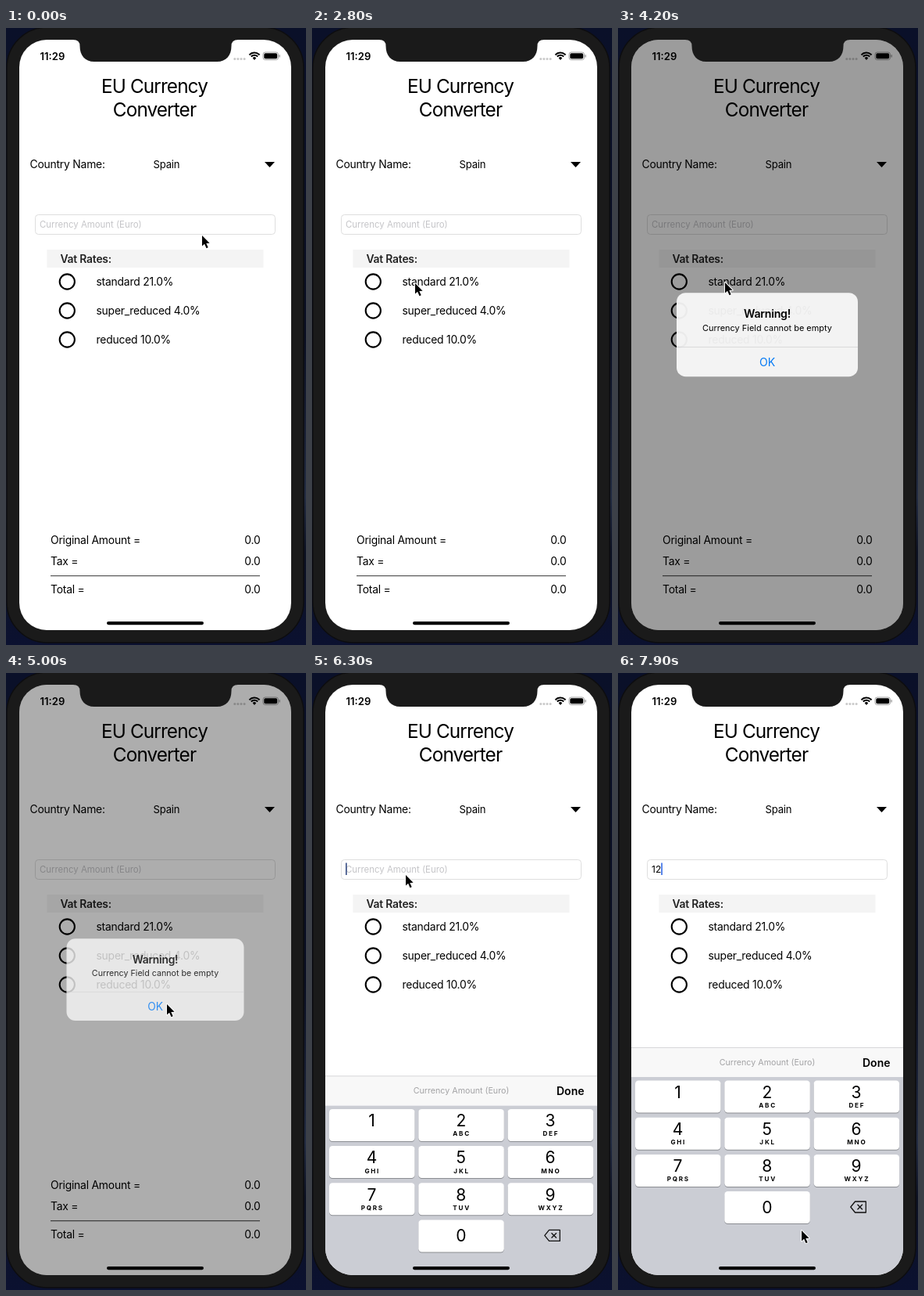
Write an HTML page with a canvas that moves like this. It is 384 px wide and 788 px high and loops after 8000 ms.

```html
<!DOCTYPE html>
<html lang="en">
<head>
<meta charset="utf-8">
<title>EU Currency Converter</title>
<style>
html, body { margin: 0; width: 100%; height: 100%; overflow: hidden; background: #0b1130; }
canvas { display: block; width: 384px; height: 788px; }
</style>
</head>
<body>
<canvas id="stage"></canvas>
<script>
const W = 384, H = 788, LOOP = 8000, STEP = 100;
const BEZEL = '#1a1a1a';
const canvas = document.getElementById('stage');
const ctx = canvas.getContext('2d');
const dpr = window.devicePixelRatio || 1;
canvas.width = W * dpr;
canvas.height = H * dpr;

// Each row: time, then values
const POINTER = [
  [0, 251, 265], [800, 251, 265], [900, 120, 203], [1000, 120, 203], [1200, 144, 197],
  [1400, 128, 225], [1600, 109, 258], [1900, 92, 315], [2100, 89, 335], [2300, 110, 343],
  [2500, 131, 325], [2600, 131, 325], [2700, 132, 322], [2800, 132, 326], [3500, 132, 326],
  [3700, 134, 325], [3800, 134, 325], [3900, 137, 325], [4300, 137, 325], [4500, 172, 378],
  [4700, 205, 421], [4900, 206, 423], [5200, 206, 423], [5400, 165, 340], [5600, 120, 253],
  [5700, 120, 258], [6300, 120, 258], [6500, 98, 390], [6700, 82, 490], [6900, 77, 537],
  [7100, 77, 537], [7300, 188, 538], [7500, 191, 538], [7700, 228, 630], [7900, 235, 712]
];
// dim, alert opacity, alert scale
const ALERT = [
  [4000, 0, 0, 1.18], [4100, .22, .6, 1.09], [4200, .39, 1, 1.022], [4300, .4, 1, 1.004],
  [4400, .4, 1, 1], [4900, .4, 1, 1], [5000, .32, .8, 1], [5100, .15, .38, 1],
  [5200, .039, .1, 1], [5300, 0, 0, 1]
];
const CLICKS = [[3000, 3100], [3900, 4100], [4900, 5000], [7000, 7100], [7400, 7500]];
const KEYS = [
  ['1', ''], ['2', 'ABC'], ['3', 'DEF'], ['4', 'GHI'], ['5', 'JKL'], ['6', 'MNO'],
  ['7', 'PQRS'], ['8', 'TUV'], ['9', 'WXYZ'], null, ['0', '']
];

const within = (t, a, b) => t >= a && t < b;

function sample(rows, t) {
  if (t <= rows[0][0]) return rows[0].slice(1);
  for (let i = 1; i < rows.length; i++) {
    const a = rows[i - 1], b = rows[i];
    if (t <= b[0]) {
      const u = (t - a[0]) / (b[0] - a[0]);
      return a.slice(1).map((v, k) => v + (b[k + 1] - v) * u);
    }
  }
  return rows[rows.length - 1].slice(1);
}

function text(s, x, y, size, { color = '#000', weight = 400, align = 'left', track = -.016 } = {}) {
  ctx.font = `${weight} ${size}px Inter, Roboto, sans-serif`;
  ctx.letterSpacing = `${size * track}px`;
  ctx.textAlign = align;
  ctx.fillStyle = color;
  ctx.fillText(s, x, y);
}

function box(x, y, w, h, r, fill, stroke, line = 1) {
  ctx.beginPath();
  ctx.roundRect(x, y, w, h, r);
  if (fill) { ctx.fillStyle = fill; ctx.fill(); }
  if (stroke) { ctx.strokeStyle = stroke; ctx.lineWidth = line; ctx.stroke(); }
}

function circle(x, y, r, fill, stroke, line) {
  ctx.beginPath();
  ctx.arc(x, y, r, 0, Math.PI * 2);
  if (fill) { ctx.fillStyle = fill; ctx.fill(); }
  if (stroke) { ctx.strokeStyle = stroke; ctx.lineWidth = line; ctx.stroke(); }
}

function poly(points, fill, stroke, line) {
  ctx.beginPath();
  points.forEach(([x, y]) => ctx.lineTo(x, y));
  ctx.closePath();
  ctx.lineJoin = 'round';
  if (stroke) { ctx.strokeStyle = stroke; ctx.lineWidth = line; ctx.stroke(); }
  if (fill) { ctx.fillStyle = fill; ctx.fill(); }
}

function drawPhone() {
  const g = ctx.createLinearGradient(0, 0, 0, H);
  g.addColorStop(0, '#0a1029');
  g.addColorStop(.5, '#0b1024');
  g.addColorStop(.76, '#232c42');
  g.addColorStop(.85, '#0d1224');
  g.addColorStop(1, '#0b1130');
  ctx.fillStyle = g;
  ctx.fillRect(0, 0, W, H);
  box(1, -1, 380, 786, 52, BEZEL, '#0d0d0f', 1.5);
}

function drawStatus() {
  text('11:29', 43.5, 41, 13.1, { weight: 600, track: 0 });
  for (let i = 0; i < 4; i++) circle(292.8 + i * 4.1, 39.6, 1.5, '#c9c9c9');
  ctx.strokeStyle = '#000';
  ctx.lineWidth = 2;
  for (const r of [9, 5.8]) {
    ctx.beginPath();
    ctx.arc(318, 40.5, r, -Math.PI * .76, -Math.PI * .24);
    ctx.stroke();
  }
  ctx.beginPath();
  ctx.moveTo(318, 41);
  ctx.arc(318, 40.5, 3.2, -Math.PI * .76, -Math.PI * .24);
  ctx.fillStyle = '#000';
  ctx.fill();
  box(329, 31, 19.5, 9.6, 2.8, null, '#999', .9);
  box(330.3, 32.3, 16.9, 7, 1.7, '#000');
  box(349.5, 34, 1.3, 3.6, .8, '#999');
}

function drawField(t) {
  box(37.5, 238.5, 307, 25, 4, '#fff', '#dedede');
  const typed = t >= 7500 ? '12' : t >= 7100 ? '1' : '';
  if (typed) text(typed, 43, 255, 12, { track: 0 });
  else text('Currency Amount (Euro)', 43, 255, 11.4, { color: '#c5c5c8', track: 0 });
  if (t >= 6300) {
    const x = typed ? 43 + ctx.measureText(typed).width : 43;
    ctx.globalAlpha = typed || within(t, 6300, 6700) || t >= 7000 ? 1 : within(t, 6700, 6800) ? .75 : .1;
    ctx.fillStyle = typed ? '#3f73e8' : '#41568a';
    ctx.fillRect(x, 242.5, 1.7, 15.5);
    ctx.globalAlpha = 1;
  }
}

function drawForm(t) {
  ctx.fillStyle = '#fff';
  ctx.fillRect(17, 15, 348, 754);
  drawStatus();
  const title = { align: 'center', track: -.036 };
  text('EU Currency', 190, 82.5, 24.3, title);
  text('Converter', 190, 112.5, 24.3, title);

  text('Country Name:', 30.5, 179, 13.9);
  text('Spain', 188.5, 179, 13.1);
  poly([[331, 171], [344, 171], [337.5, 178]], '#000');
  drawField(t);

  ctx.fillStyle = '#f4f4f4';
  ctx.fillRect(52.5, 283, 277, 23);
  text('Vat Rates:', 69.5, 300, 13.9, { weight: 600, color: '#222' });
  ['standard 21.0%', 'super_reduced 4.0%', 'reduced 10.0%'].forEach((s, i) => {
    const y = 324 + i * 37;
    circle(78.3, y, 9.6, null, '#000', 2.1);
    text(s, 115.5, y + 5, 13.9);
  });

  [['Original Amount =', 658.5], ['Tax =', 686], ['Total =', 721.5]].forEach(([s, y]) => {
    text(s, 57, y, 13.9);
    text('0.0', 325.5, y, 13.9, { align: 'right' });
  });
  ctx.fillStyle = '#333';
  ctx.fillRect(57, 699.2, 268, 1);
}

function drawAlert(t) {
  const [dim, alpha, scale] = sample(ALERT, t);
  if (!alpha) return;
  ctx.fillStyle = `rgba(0,0,0,${dim})`;
  ctx.fillRect(17, 15, 348, 754);
  ctx.save();
  ctx.globalAlpha = alpha;
  ctx.translate(191, 391.7);
  ctx.scale(scale, scale);
  box(-113.5, -52.4, 227, 104.8, 11.3, `rgba(248,248,248,${t <= 4200 ? .945 : .975})`);
  if (within(t, 4900, 5000)) box(-113.5, 15.6, 227, 36.8, [0, 0, 11.3, 11.3], '#dcdcdc');
  text('Warning!', 0, -21.2, 13.8, { weight: 600, align: 'center' });
  text('Currency Field cannot be empty', 0, -4.6, 10.7, { align: 'center', track: 0 });
  ctx.fillStyle = '#d3d3d5';
  ctx.fillRect(-113.5, 15.2, 227, .8);
  text('OK', 0, 39.4, 13.8, { color: '#067bf5', align: 'center' });
  ctx.restore();
}

function drawBackspace() {
  poly([[297.8, 682], [303.5, 675], [317.3, 675], [317.3, 689], [303.5, 689]], null, '#111', 1.3);
  ctx.beginPath();
  ctx.moveTo(306.5, 678.8);
  ctx.lineTo(312.9, 685.2);
  ctx.moveTo(312.9, 678.8);
  ctx.lineTo(306.5, 685.2);
  ctx.stroke();
}

function drawKeyboard(t) {
  if (t < 6200) return;
  const u = Math.min(1, (t - 6100) / 400);
  ctx.save();
  ctx.translate(0, 291 * (1 - u) ** 3);
  ctx.fillStyle = '#cbcdd4';
  ctx.fillRect(17, 516, 348, 253);
  ctx.fillStyle = '#f8f8f8';
  ctx.fillRect(17, 478, 348, 38);
  ctx.fillStyle = '#d4d4d6';
  ctx.fillRect(17, 478, 348, .9);
  text('Currency Amount (Euro)', 191, 501, 10.7, { color: '#a3a3a5', align: 'center', track: 0 });
  text('Done', 313, 502.5, 14, { weight: 600, track: 0 });

  const pressed = within(t, 7000, 7100) ? '1' : within(t, 7400, 7500) ? '2' : '';
  KEYS.forEach((key, i) => {
    if (!key) return;
    const [digit, letters] = key;
    const x = 22 + (i % 3) * 114.3, y = 520.5 + Math.floor(i / 3) * 47.2;
    box(x, y + 1, 109.5, 41, 4.2, '#8b8d92');
    box(x, y, 109.5, 41, 4.2, digit === pressed ? '#b3b7c1' : '#fff');
    const mid = x + 54.5;
    text(digit, mid, y + (digit === '0' ? 27.8 : 22.3), 21, { align: 'center', track: 0 });
    text(letters, mid + .8, y + 34.5, 8.1, { weight: 700, align: 'center', track: .22 });
  });
  drawBackspace();
  ctx.restore();
}

function drawNotch() {
  ctx.beginPath();
  ctx.moveTo(86, 14);
  ctx.lineTo(86, 15);
  ctx.quadraticCurveTo(94.5, 15, 94.5, 23);
  ctx.bezierCurveTo(94.5, 35, 101, 43, 113, 43);
  ctx.lineTo(270, 43);
  ctx.bezierCurveTo(282, 43, 288.5, 35, 288.5, 23);
  ctx.quadraticCurveTo(288.5, 15, 297, 15);
  ctx.lineTo(297, 14);
  ctx.fillStyle = BEZEL;
  ctx.fill();
}

function drawPointer(t) {
  const [x, y] = sample(POINTER, t);
  if (CLICKS.some(([a, b]) => within(t, a, b))) {
    circle(x, y + 1, 20, 'rgba(255,255,255,.25)', '#000', 2.6);
  }
  ctx.save();
  ctx.translate(x, y);
  poly([[0, 0], [0, 13.6], [3.1, 10.8], [5.5, 16.2], [7.7, 15.2], [5.3, 9.9], [9.6, 9.7]],
    '#000', '#fff', 2);
  ctx.restore();
}

function draw(t) {
  ctx.setTransform(dpr, 0, 0, dpr, 0, 0);
  drawPhone();
  ctx.save();
  ctx.beginPath();
  ctx.roundRect(17, 15, 348, 754, 35);
  ctx.clip();
  drawForm(t);
  drawAlert(t);
  drawKeyboard(t);
  ctx.restore();
  drawNotch();
  box(129, 758, 124, 4.2, 2.1, '#000');
  drawPointer(t);
}

const start = performance.now();
function tick() {
  const t = (performance.now() - start) % LOOP;
  draw(Math.floor(t / STEP) * STEP);
  requestAnimationFrame(tick);
}
tick();
</script>
</body>
</html>
```
